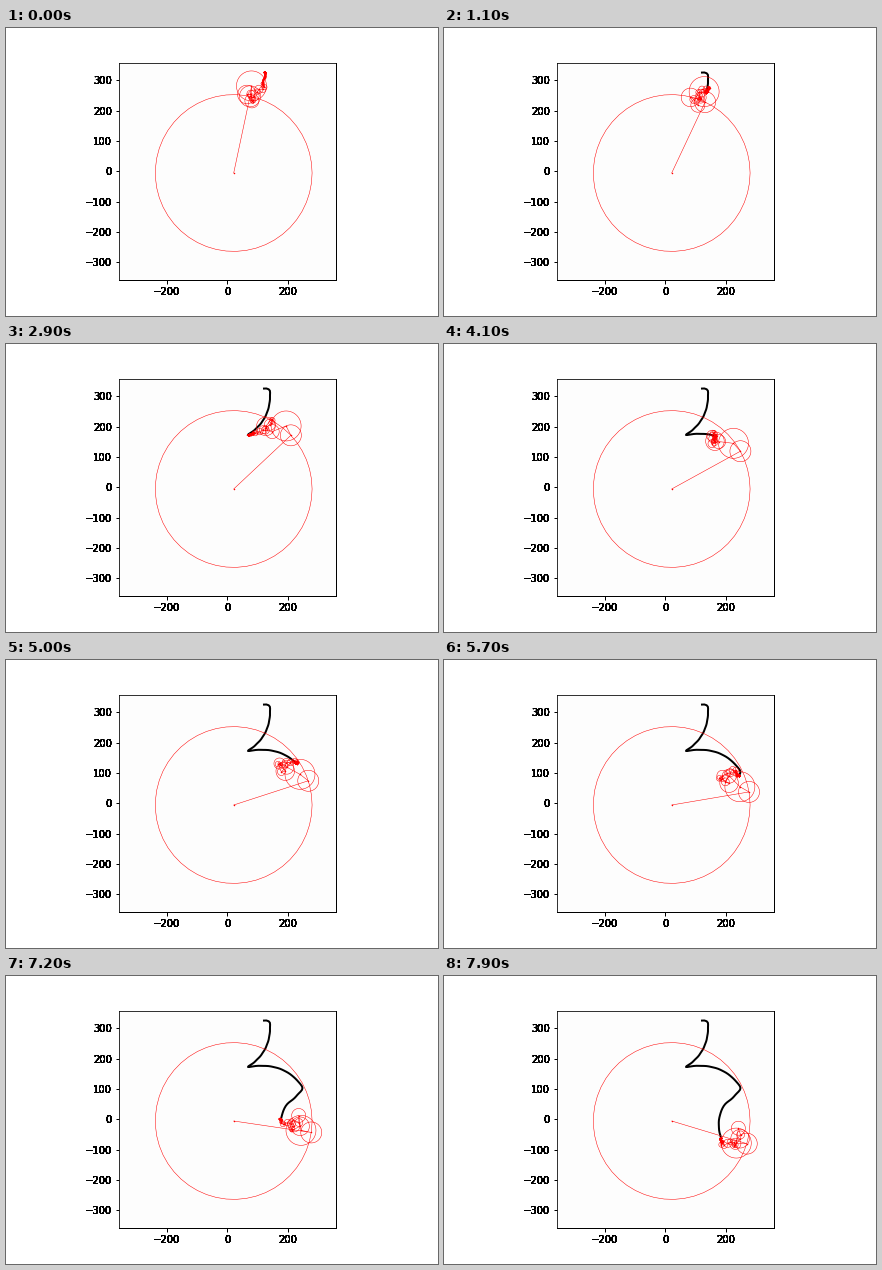
Animation of 432 by 288 pixels, one loop 8000 ms. Source, as a matplotlib script:

```python
import numpy as np
import matplotlib.pyplot as plt
from matplotlib.animation import FuncAnimation
from matplotlib.collections import LineCollection

W, H, DPI = 432, 288, 72
FRAMES, TURN = 80, 300       # frames shown, frames per full revolution
ORDER, LIMIT = 60, 358
LEFT, BOTTOM, SIZE = 112.68, 36, 217.44
SCALE = SIZE / (2 * LIMIT)
INK = 16                     # label overprints, gives the heavy text

# Outline corners (stage pixels, y down), the frames they are reached,
# and the control point of the curve between each pair
CORNERS = [258 + 44.5j, 263.8 + 45.5j, 241 + 91.3j, 297 + 112j, 281 + 128j, 277 + 162j]
CONTROLS = [261 + 44.5j, 266.5 + 76j, 279 + 84j, 291 + 121j, 271 + 143j]
TIMES = [0, 2.5, 29, 55, 65, 79]


def to_data(p):
    return np.conj(p - (LEFT + SIZE / 2) - 1j * (H - BOTTOM - SIZE / 2)) / SCALE


def arm(radius, degrees):
    return radius / SCALE * np.exp(1j * np.radians(degrees))


def outline(n):
    i = np.clip(np.searchsorted(TIMES, n, side="right") - 1, 0, len(CONTROLS) - 1)
    t0, t1 = np.take(TIMES, i), np.take(TIMES, i + 1)
    t = (n - t0) / (t1 - t0)
    a, b, c = np.take(CORNERS, i), np.take(CONTROLS, i), np.take(CORNERS, i + 1)
    return to_data((1 - t) ** 2 * a + 2 * t * (1 - t) * b + t ** 2 * c)


def build_arms(n):
    """Five large arms are set; the small ones carry the pen along the outline."""
    orders = np.array([0] + [s * k for k in range(1, ORDER + 1) for s in (1, -1)])
    spin = np.exp(-2j * np.pi * np.outer(n, orders) / TURN)
    big = np.array([to_data(227.7 + 145j), arm(78.4, 78), arm(10.5, 82),
                    arm(15, 271.6), arm(7, 99)])
    m = len(big)
    rest = outline(n) - spin[:, :m] @ big
    weight = np.abs(orders[m:]) ** -0.7
    u = np.linalg.lstsq(spin[:, m:] * weight, rest, rcond=0.01)[0]
    return spin, np.concatenate([big, u * weight])


spin, arms = build_arms(np.arange(FRAMES))
joints = np.cumsum(spin * arms, axis=1)
radii = np.abs(arms[1:])
ring = np.exp(1j * np.linspace(0, 2 * np.pi, 50))

fig = plt.figure(figsize=(W / DPI, H / DPI), dpi=DPI, facecolor="white")
ax = fig.add_axes([LEFT / W, BOTTOM / H, SIZE / W, SIZE / H], facecolor="#fdfdfd")
xticks, yticks = range(-200, 201, 200), range(-300, 301, 100)
ax.set(xlim=(-LIMIT, LIMIT), ylim=(-LIMIT, LIMIT), xticks=xticks, yticks=yticks)
ax.tick_params(width=1, labelbottom=False, labelleft=False)
for side in ("right", "bottom"):
    ax.spines[side].set_linewidth(1)


def label(x, y, value, placement):
    trans, va, ha = placement
    text = str(value).replace("-", "\u2212")
    for _ in range(INK):
        ax.text(x, y, text, transform=trans, va=va, ha=ha,
                fontsize=10, family="DejaVu Sans")


for v in xticks:
    label(v, 0, v, ax.get_xaxis_text1_transform(7))
for v in yticks:
    label(0, v, v, ax.get_yaxis_text1_transform(7))

trace, = ax.plot([], [], "k-", lw=2, zorder=2)
circles = LineCollection([], colors="r", linewidths=0.5, zorder=2.2)
ax.add_collection(circles, autolim=False)
links, = ax.plot([], [], "r-", lw=0.5, marker="o", ms=1.5, mew=0, zorder=2.3)


def draw(n):
    chain = joints[n]
    rings = chain[:-1, None] + radii[:, None] * ring
    circles.set_segments(np.stack([rings.real, rings.imag], axis=-1))
    links.set_data(chain.real, chain.imag)
    path = joints[:n + 1, -1]
    trace.set_data(path.real, path.imag)
    return trace, circles, links


anim = FuncAnimation(fig, draw, frames=FRAMES, interval=100,
                     repeat=True, repeat_delay=0, blit=False)
plt.show()
```
